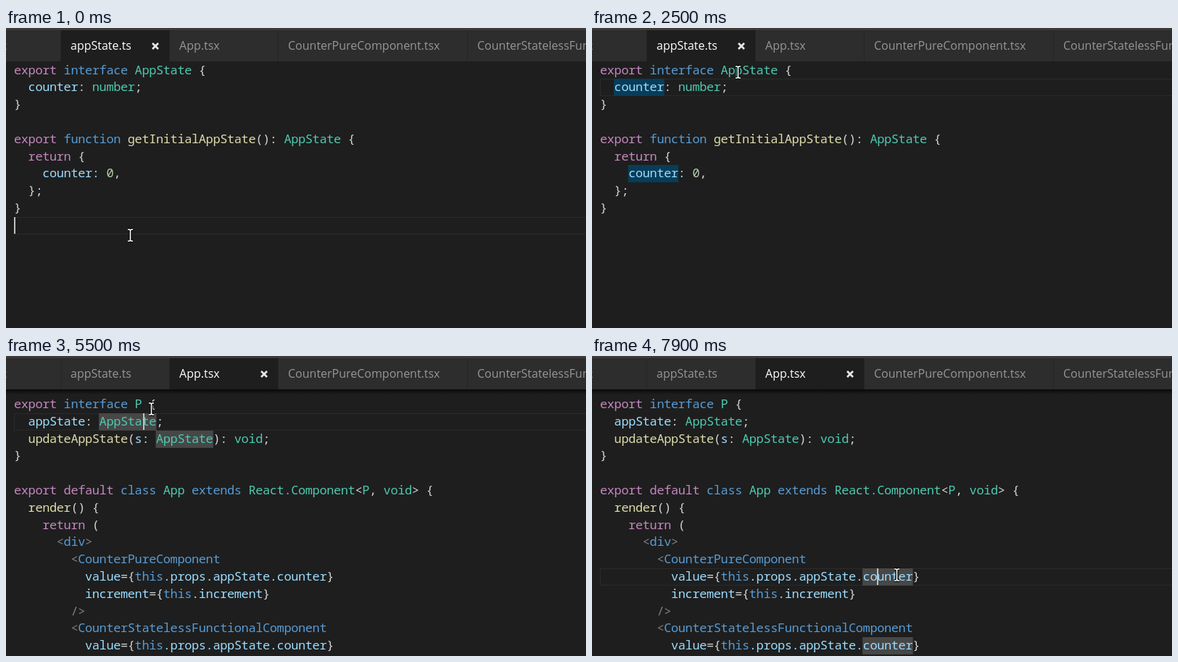
An HTML page with a canvas that plays this animation: 800x414 px, repeating every 8000 ms.

```html
<!DOCTYPE html>
<html>
<head>
<meta charset="utf-8">
<style>
  html, body { margin: 0; width: 100%; height: 100%; overflow: hidden; background: #1e1e1e; }
  canvas { display: block; }
</style>
</head>
<body>
<canvas id="stage" width="800" height="414"></canvas>
<script>
const ctx = document.getElementById('stage').getContext('2d');
const LOOP = 8000, LEFT = 11, COL = 9.8, ROW = 23.8, BLINK = 460, MARK_DELAY = 200;
const COLORS = {
  p: '#c586c0', b: '#569cd6', t: '#4ec9b0', y: '#dcdcaa',
  v: '#9cdcfe', n: '#b5cea8', g: '#808080', w: '#d4d4d4'
};
const BLUE = '#083d59', GRAY = '#474747';

// Segments are split by "~"; the first letter of each picks its colour.
const counterValue = 'w          ~vvalue~w={~bthis~v.props.appState.counter~w}';
const files = [
  { top: 46.5, lines: [
    'pexport ~binterface ~tAppState ~w{',
    'w  ~vcounter~w: ~tnumber~w;',
    'w}',
    '',
    'pexport ~bfunction ~ygetInitialAppState~w(): ~tAppState ~w{',
    'w  ~preturn ~w{',
    'w    ~vcounter: ~n0~w,',
    'w  };',
    'w}'
  ] },
  { top: 55, scrolled: true, lines: [
    'pexport ~binterface ~tP ~w{',
    'w  ~vappState~w: ~tAppState~w;',
    'w  ~yupdateAppState~w(~vs~w: ~tAppState~w): ~tvoid~w;',
    'w}',
    '',
    'pexport default ~bclass ~tApp ~bextends ~tReact.Component~w<~tP~w, ~tvoid~w> {',
    'w  ~yrender~w() {',
    'w    ~preturn ~w(',
    'w      ~g<~bdiv~g>',
    'w        ~g<~bCounterPureComponent',
    counterValue,
    'w          ~vincrement~w={~bthis~v.increment~w}',
    'w        ~g/>',
    'w        ~g<~bCounterStatelessFunctionalComponent',
    counterValue
  ] }
];

const tabs = [
  { x: -80, w: 155 },
  { x: 76, w: 149, name: 'appState.ts' },
  { x: 226, w: 149, name: 'App.tsx' },
  { x: 376, w: 260, name: 'CounterPureComponent.tsx' },
  { x: 637, w: 340, name: 'CounterStatelessFunctionalComponent.tsx' }
];

// Caret placements; marks are [row, column, length, colour].
const clicks = [
  { at: -260, file: 0, row: 9, col: 0, marks: [] },
  { at: 1100, file: 0, row: 1, col: 6, marks: [[1, 2, 7, BLUE], [6, 4, 7, BLUE]] },
  { at: 2600, file: 0, row: 0, col: 19, marks: [[0, 17, 8, BLUE], [4, 38, 8, GRAY]] },
  { at: 4100, file: 1, row: 10, col: 0, marks: [] },
  { at: 5100, file: 1, row: 1, col: 18.2, marks: [[1, 12, 8, GRAY], [2, 20, 8, GRAY]] },
  { at: 6900, file: 1, row: 10, col: 39, marks: [[10, 37, 7, GRAY], [14, 37, 7, GRAY]] }
];

// Mouse path: time, x, y.
const path = [
  [0, 171, 286], [100, 171, 286], [300, 184, 282], [1000, 73, 88], [1200, 73, 88],
  [1500, 80, 112], [1900, 201, 92], [2500, 201, 61], [2700, 201, 61], [3200, 290, 120],
  [3600, 300, 75], [3700, 280, 34], [3800, 273, 31], [4200, 273, 31], [4600, 278, 60],
  [5000, 194, 90], [5300, 194, 90], [5500, 200, 73], [6200, 364, 245], [6400, 379, 275],
  [6700, 400, 308], [7200, 400, 308], [7500, 490, 335], [7900, 420, 302], [8000, 420, 302]
];

function mouseAt(t) {
  const i = path.findIndex(p => p[0] > t);
  const [t0, x0, y0] = path[i - 1], [t1, x1, y1] = path[i];
  const u = (t - t0) / (t1 - t0), e = u * u * (3 - 2 * u);
  return { x: Math.round(x0 + (x1 - x0) * e), y: Math.round(y0 + (y1 - y0) * e) };
}

function rect(x, y, w, h, color) {
  ctx.fillStyle = color;
  ctx.fillRect(x, y, w, h);
}

function drawCode(file, click, t) {
  const rowTop = row => Math.round(file.top + row * ROW);
  const colX = col => LEFT + col * COL;

  ctx.strokeStyle = '#2b2b2b';
  ctx.lineWidth = 1;
  ctx.strokeRect(LEFT + .5, rowTop(click.row) + .5, 820, ROW - 1);

  if (t >= click.at + MARK_DELAY)
    for (const [row, col, len, color] of click.marks)
      rect(colX(col) - .5, rowTop(row), len * COL + 1, ROW, color);

  ctx.font = '17px "Noto Sans Mono", "DejaVu Sans Mono", monospace';
  ctx.letterSpacing = '-0.4px';
  file.lines.forEach((line, row) => {
    let col = 0;
    for (const part of line.split('~')) {
      ctx.fillStyle = COLORS[part[0]];
      ctx.fillText(part.slice(1), colX(col), rowTop(row) + 17);
      col += Math.max(0, part.length - 1);
    }
  });
  ctx.letterSpacing = '0px';

  if (Math.floor((t - click.at) / BLINK) % 2 === 0)
    rect(Math.round(colX(click.col)), rowTop(click.row), 2, 23, '#c0c1bf');
}

function drawClose(x, y) {
  ctx.strokeStyle = '#e8e8e8';
  ctx.lineWidth = 2.6;
  ctx.beginPath();
  ctx.moveTo(x - 4, y - 4); ctx.lineTo(x + 4, y + 4);
  ctx.moveTo(x + 4, y - 4); ctx.lineTo(x - 4, y + 4);
  ctx.stroke();
}

function drawTabs(file, mouse) {
  rect(0, 0, 800, 46, '#252526');
  rect(0, 0, 800, 3, '#3c3b37');
  ctx.font = '16px "Open Sans", "Noto Sans", sans-serif';
  tabs.forEach((tab, i) => {
    const active = i === file + 1;
    const hover = mouse.y < 46 && mouse.x >= tab.x && mouse.x < tab.x + tab.w;
    rect(tab.x, 3, tab.w, 43, active ? '#1e1e1e' : '#2d2d2d');
    ctx.fillStyle = active ? '#ffffff' : '#969696';
    if (tab.name) ctx.fillText(tab.name, tab.x + 13, 30);
    else ctx.fillText('x', -7, 30);
    if (active || hover) drawClose(tab.x + 130, 25);
  });
  if (files[file].scrolled) {
    const shade = ctx.createLinearGradient(0, 46, 0, 53);
    shade.addColorStop(0, 'rgba(0,0,0,.7)');
    shade.addColorStop(1, 'rgba(0,0,0,0)');
    rect(0, 46, 800, 7, shade);
  }
}

const beam = new Path2D('M-3.5-8H-1.5L0-7L1.5-8H3.5M0-7V7M-3.5 8H-1.5L0 7L1.5 8H3.5');
const hand = new Path2D('M-2 1Q0-2 2 1V7Q5 5 6 8Q9 6 10 9Q13 8 13 11V14L11 18H2L-5 11Q-5 8-2 10Z');

function drawMouse({ x, y }) {
  ctx.save();
  ctx.translate(x, y);
  ctx.lineJoin = 'round';
  if (y < 46) {
    ctx.strokeStyle = '#000';
    ctx.lineWidth = 2.5;
    ctx.stroke(hand);
    ctx.fillStyle = '#fff';
    ctx.fill(hand);
    for (const fx of [4, 7, 10]) rect(fx - .5, 12, 1, 4, '#000');
  } else {
    ctx.translate(.5, 0);
    ctx.strokeStyle = '#000';
    ctx.lineWidth = 4;
    ctx.stroke(beam);
    ctx.strokeStyle = '#fff';
    ctx.lineWidth = 1.6;
    ctx.stroke(beam);
  }
  ctx.restore();
}

function draw(now) {
  const t = Math.floor(now % LOOP / 100) * 100;
  const click = clicks.filter(c => c.at <= t).pop();
  const mouse = mouseAt(t);
  rect(0, 0, 800, 414, '#1e1e1e');
  drawCode(files[click.file], click, t);
  drawTabs(click.file, mouse);
  drawMouse(mouse);
}

let start;
function tick(now) {
  start ??= now;
  draw(now - start);
  requestAnimationFrame(tick);
}
draw(0);
requestAnimationFrame(tick);
</script>
</body>
</html>
```
